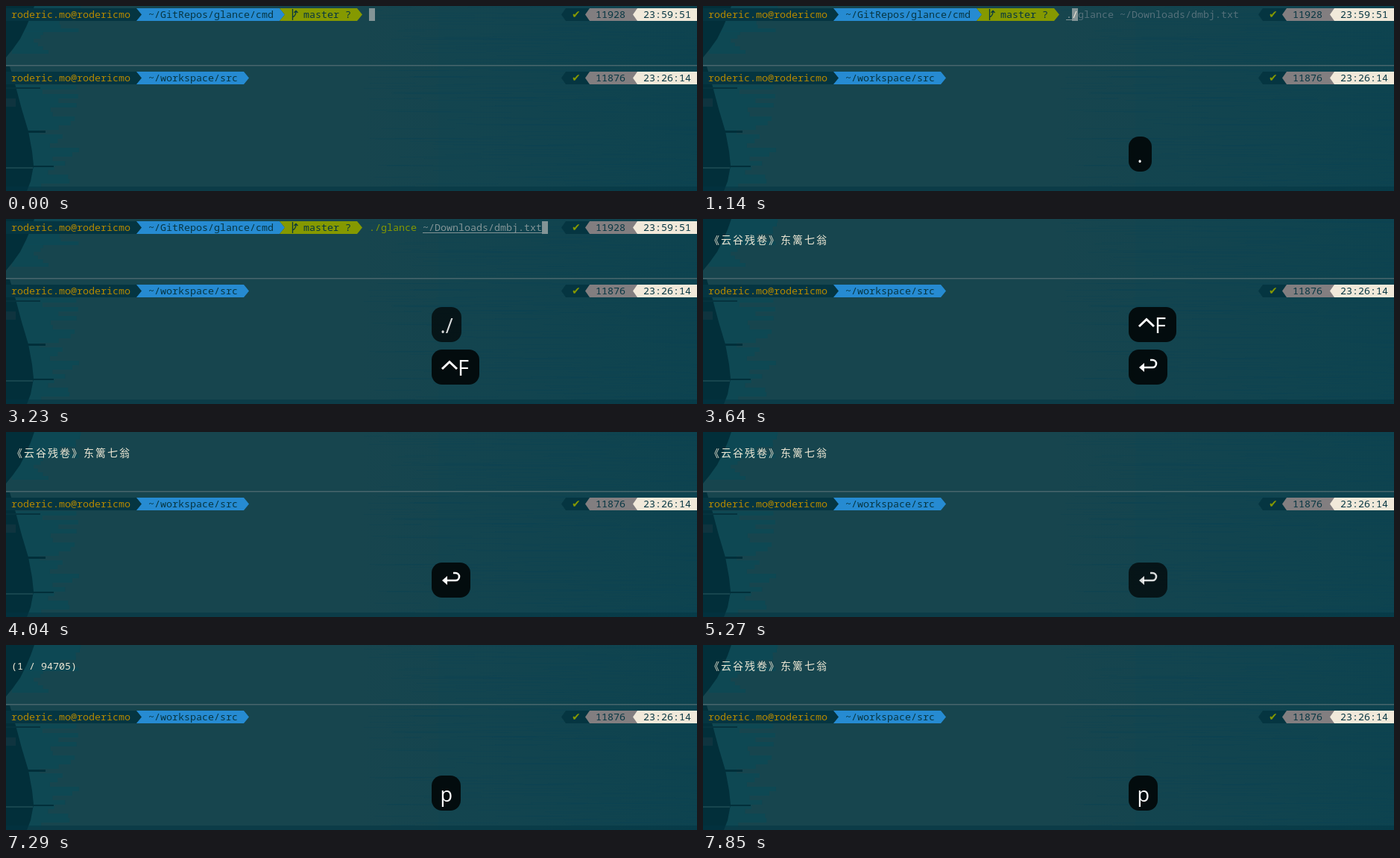
An HTML page with a canvas for the animation above (8 s loop, 927x248 px).

```html
<!DOCTYPE html>
<html lang="en">
<head>
<meta charset="utf-8">
<title>Terminal session</title>
<style>
  html, body { margin: 0; width: 100%; height: 100%; overflow: hidden; background: #17454e; }
  canvas { display: block; width: 927px; height: 248px; }
</style>
</head>
<body>
<canvas id="stage" width="927" height="248"></canvas>
<script>
const LOOP = 8000, W = 927, H = 248, CELL = 8, LINE = 17, LEFT = 7;
const ctx = document.getElementById('stage').getContext('2d');
const MONO = '13.333px "Noto Sans Mono", "DejaVu Sans Mono", monospace';
const CJK = '500 14px "Noto Sans CJK SC", "Noto Sans CJK", sans-serif';
const C = {
  dark: '#053541', ink: '#073642', user: '#b58900', blue: '#268bd2', green: '#859900',
  grey: '#827e80', cream: '#f1e9da', cursor: '#839496', hint: '#55707a', typed: '#93a1a1', text: '#eee8d5'
};
const USER = 'roderic.mo@rodericmo';
const COMMAND = './glance ~/Downloads/dmbj.txt';
const TITLE = '《云谷残卷》东篱七翁';

// Key overlay: fade is when the dimming starts, moves are the times it is pushed up one slot.
const KEYS = [
  { label: '.', width: 31, start: 1110, end: 1250, moves: [] },
  { label: './', width: 40, start: 1250, fade: 3230, moves: [1880, 3290] },
  { label: '^F', width: 64, start: 1880, fade: 3870, moves: [3290] },
  { label: 'return', width: 52, start: 3290, fade: 5270, moves: [] },
  { label: 'p', width: 39, start: 5670, fade: 7650, moves: [] },
  { label: 'p', width: 39, start: 7850, end: LOOP, moves: [] }
];

function rect(c, x, y, w, h, color) {
  c.fillStyle = color;
  c.fillRect(x, y, w, h);
}

function polygon(c, color, ...points) {
  c.fillStyle = color;
  c.beginPath();
  points.forEach(([x, y]) => c.lineTo(x, y));
  c.fill();
}

function text(string, x, y, color, font = MONO) {
  ctx.font = font;
  ctx.fillStyle = color;
  ctx.fillText(string, x, y);
}

function makeBackground() {
  const canvas = document.createElement('canvas');
  canvas.width = W;
  canvas.height = H;
  const c = canvas.getContext('2d');
  let seed = 11;
  const random = () => (seed = seed * 16807 % 2147483647) / 2147483647;

  rect(c, 0, 0, W, H, '#17454e');
  const shade = c.createLinearGradient(470, 0, W, 0);
  shade.addColorStop(0, 'rgba(10,66,80,0)');
  shade.addColorStop(1, 'rgba(10,66,80,.65)');
  rect(c, 470, 0, W - 470, H, shade);
  rect(c, 580, 0, W - 580, H, 'rgba(12,68,80,.12)');
  for (let i = 0; i < 260; i++) {
    const x = 480 + random() * 440;
    rect(c, x, Math.floor(random() * H), 20 + random() * 130, 1, 'rgba(8,66,82,.28)');
  }

  for (let y = 0; y < 34; y += 5) rect(c, 20, y, 45 + random() * 45, 5, 'rgba(10,74,86,.75)');
  for (let y = 34; y < 62; y += 5) rect(c, 8, y, 25 + random() * 25, 5, 'rgba(10,74,86,.65)');
  for (let y = 106; y < 242; y += 6) rect(c, 12, y, 30 + random() * 60, 6, 'rgba(10,74,86,.7)');

  polygon(c, '#022f3a', [0, 0], [38, 0], [33, 14], [27, 28], [19, 44], [9, 58], [0, 69]);
  polygon(c, '#022f3a', [0, 81], [5, 81], [13, 108], [21, 138], [30, 168], [35, 195],
    [37, 214], [33, 235], [28, H], [0, H]);
  rect(c, 0, 124, 13, 11, 'rgba(40,62,72,.35)');
  rect(c, 0, 109, 46, 2, '#06333e');
  rect(c, 0, 167, 53, 3, '#022f3a');
  rect(c, 0, 214, 64, 2, '#022f3a');
  rect(c, 0, 216, 36, 2, '#17454e');
  rect(c, 0, 242, W, 6, 'rgba(3,52,66,.5)');
  rect(c, 0, 79, W, 1.5, '#48666c');
  return canvas;
}
const background = makeBackground();

// A segment with a pointed right end; every one after the first has a matching notch.
function rightArrow(x, end, y, color, notch) {
  polygon(ctx, color, [x, y], [end, y], [end + 7, y + LINE / 2], [end, y + LINE],
    [x, y + LINE], [x + notch, y + LINE / 2]);
}

function leftArrow(x, end, y, color) {
  polygon(ctx, color, [x - 6, y + LINE / 2], [x, y], [end, y], [end, y + LINE], [x, y + LINE]);
}

function branchIcon(y) {
  ctx.strokeStyle = C.ink;
  ctx.lineWidth = 1.3;
  ctx.beginPath();
  ctx.moveTo(384.5, y + 1);
  ctx.lineTo(384.5, y + 16);
  ctx.moveTo(384.5, y + 12);
  ctx.quadraticCurveTo(389, y + 10, 389, y + 4);
  ctx.moveTo(386.5, y + 6);
  ctx.lineTo(389, y + 3.5);
  ctx.lineTo(391.5, y + 6);
  ctx.stroke();
}

function prompt(y, path, branch, history, clock) {
  const base = y + 13;
  const pathEnd = 199 + path.length * CELL;
  rightArrow(0, 175, y, C.dark, 0);
  text(USER, LEFT, base, C.user);
  rightArrow(175, pathEnd, y, C.blue, 7);
  text(path, 191, base, C.ink);
  if (branch) {
    rightArrow(pathEnd, 471, y, C.green, 7);
    branchIcon(y);
    text(branch, 399, base, C.ink);
  }
  leftArrow(751, 784, y, C.dark);
  text('✔', 759, base, C.green, '14px "DejaVu Sans", sans-serif');
  leftArrow(783, 848, y, C.grey);
  text(history, 791, base, C.ink);
  leftArrow(847, W, y, C.cream);
  text(clock, 855, base, C.ink);
}

function commandLine(t) {
  const x = 487, y = 3, base = 16;
  const at = n => x + n * CELL;
  const cursor = (cx, cy) => rect(ctx, cx, cy, CELL, LINE, C.cursor);
  const underline = (from, to) => rect(ctx, at(from), y + 15, (to - from) * CELL, 1, C.cursor);
  if (t < 1080) {
    cursor(x, y);
  } else if (t < 2600) {
    const typed = t < 1220 ? 1 : 2;
    text(COMMAND.slice(0, typed), x, base, C.typed);
    underline(0, typed);
    text(COMMAND.slice(typed + 1), at(typed + 1), base, C.hint);
    cursor(at(typed), y);
    text(COMMAND[typed], at(typed), base, C.cream);
  } else {
    text(COMMAND.slice(0, 8), x, base, C.green);
    text(COMMAND.slice(9), at(9), base, C.cursor);
    underline(9, COMMAND.length);
    if (t < 3290) cursor(at(COMMAND.length), y);
    else cursor(LEFT, y + LINE);
  }
}

function reader(t) {
  if (t >= 5640 && t < 7820) text('(1 / 94705)', LEFT, 33, C.text);
  else [...TITLE].forEach((char, i) => text(char, LEFT + 1 + i * 2 * CELL, 33, C.text, CJK));
}

function returnIcon(x, y) {
  ctx.beginPath();
  ctx.moveTo(x + 19, y + 24);
  ctx.lineTo(x + 32, y + 24);
  ctx.arc(x + 32, y + 19, 5, Math.PI / 2, -Math.PI / 2, true);
  ctx.lineTo(x + 29, y + 14);
  ctx.stroke();
  polygon(ctx, '#fff', [x + 14, y + 24], [x + 21, y + 18], [x + 21, y + 30]);
}

function keyCap(key, t) {
  const steps = key.fade && t >= key.fade ? Math.floor((t - key.fade) / 28) + 1 : 0;
  const opacity = 1 - steps * 0.15;
  if (t < key.start || t >= (key.end ?? LOOP) || opacity <= 0) return;
  const x = 571, y = 175 - 57 * key.moves.filter(time => t >= time).length;
  const font = '27px "Open Sans", "Noto Sans", sans-serif';

  ctx.save();
  ctx.globalAlpha = opacity;
  ctx.fillStyle = 'rgba(3,8,9,.93)';
  ctx.beginPath();
  ctx.roundRect(x, y, key.width, 47, 14);
  ctx.fill();
  ctx.strokeStyle = '#fff';
  ctx.lineWidth = 2.6;
  if (key.label === 'return') {
    returnIcon(x, y);
  } else if (key.label === '^F') {
    ctx.lineWidth = 3;
    ctx.beginPath();
    ctx.moveTo(x + 14, y + 26);
    ctx.lineTo(x + 24, y + 16.5);
    ctx.lineTo(x + 34, y + 26);
    ctx.stroke();
    text('F', x + 35, y + 35, '#fff', font.replace('27', '29'));
  } else {
    text(key.label, x + 11.5, y + 35, '#fff', font);
  }
  ctx.restore();
}

function draw(t) {
  ctx.drawImage(background, 0, 0);
  if (t < 3640) {
    prompt(3, '~/GitRepos/glance/cmd', 'master ?', '11928', '23:59:51');
    commandLine(t);
  } else {
    reader(t);
  }
  prompt(88, '~/workspace/src', '', '11876', '23:26:14');
  KEYS.forEach(key => keyCap(key, t));
}

const began = performance.now();
function tick() {
  draw((performance.now() - began) % LOOP);
  requestAnimationFrame(tick);
}
tick();
</script>
</body>
</html>
```
